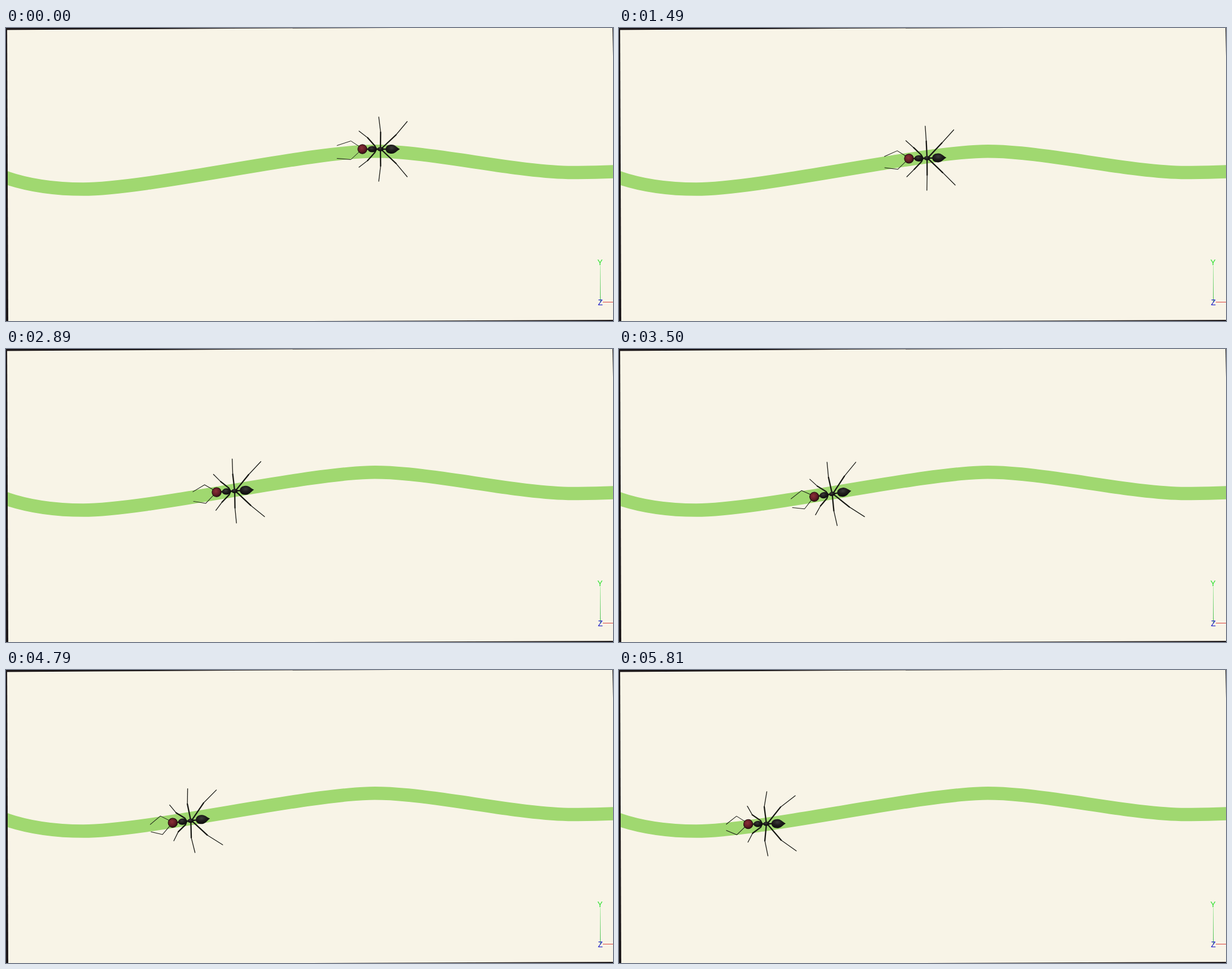
These frames come from a looping animation (1078x520 px, 5.84 s). An HTML page:

```html
<!DOCTYPE html>
<html lang="en">
<head>
<meta charset="utf-8">
<title>Ant on a trail</title>
<style>
  html, body { margin: 0; width: 100%; height: 100%; overflow: hidden; background: #1a1517; }
  svg { display: block; width: 100vw; height: 100vh; }
  #limbs path { fill: none; stroke: #171713; stroke-linecap: round; stroke-linejoin: round; }
  text { font: 14px "Liberation Sans", Arial, sans-serif; text-anchor: middle; }
</style>
</head>
<body>
<svg viewBox="0 0 1078 520" preserveAspectRatio="none">
  <defs>
    <radialGradient id="red" cx=".42" cy=".38" r=".65">
      <stop offset="0" stop-color="#8c3038"/>
      <stop offset=".6" stop-color="#621d26"/>
      <stop offset="1" stop-color="#2c0d12"/>
    </radialGradient>
    <radialGradient id="shell" cx=".42" cy=".36" r=".65">
      <stop offset="0" stop-color="#3b3b39"/>
      <stop offset=".5" stop-color="#1d1b1b"/>
      <stop offset="1" stop-color="#0c0b0b"/>
    </radialGradient>
    <linearGradient id="axis" gradientUnits="userSpaceOnUse" x1="0" y1="422" x2="0" y2="486">
      <stop offset="0" stop-color="#b4ecae"/>
      <stop offset="1" stop-color="#35b83c"/>
    </linearGradient>
    <clipPath id="sheet">
      <path id="edge" d="M2 3.5L160 2.5L400 1L690 0H1077L1078 50V518L540 520H4Z"/>
    </clipPath>
  </defs>
  <use href="#edge" fill="#f8f4e7"/>
  <path clip-path="url(#sheet)" fill="none" stroke="#a0d870" stroke-width="23.6"
    d="M-20 258C30 279 85 286 137 286C252 286 540 218.7 655 218.7C755 218.7 907 256.5 1007 256.5Q1050 256.5 1090 254.5"/>

  <path d="M1055.5 422V486" stroke="url(#axis)"/>
  <path d="M1060 486.5H1078" stroke="#d8403c"/>
  <text x="1055" y="420.5" fill="#22e022">Y</text>
  <text x="1055.5" y="492" fill="#1616c8">Z</text>

  <g id="ant">
    <g id="limbs"></g>
    <path d="M-24 0H10" stroke="#171713" stroke-width="2.5"/>
    <ellipse cx="-14.5" rx="8" ry="5.6" fill="url(#shell)"/>
    <ellipse rx="5.5" ry="3.8" fill="url(#shell)"/>
    <path d="M9 0C10 -6 14 -8 20 -8C26 -8 29 -3 34.5 0C29 3 26 8 20 8C14 8 10 6 9 0Z" fill="url(#shell)"/>
    <circle cx="-32" r="8.2" fill="url(#red)" stroke="#1d0b0d"/>
  </g>
</svg>
<script>
const LOOP = 5840, FIRST = 30, STEPS = 124;
const STEP = (LOOP - 2 * FIRST) / (STEPS - 1);

// where the ant is: step, x, y, heading in degrees
const route = [
  [0, 665, 215, 0],
  [14, 587, 222, -5.5],
  [32, 547, 231, -1.5],
  [62, 406, 252, -3.8],
  [87, 353, 262, -14],
  [102, 328, 267.5, -6.6],
  [124, 261.5, 273, -1]
];

// one side of the ant, facing left: hip, joint and resting foot
const legs = [
  { hip: [-7, 0], joint: [-10, 6], foot: [-38, 32] },
  { hip: [0, 0], joint: [0, 3], foot: [-3, 57] },
  { hip: [1, 0], joint: [5, 4], foot: [47.5, 49] }
];

const ant = document.getElementById("ant"), limbs = document.getElementById("limbs");

function limb(width) {
  const p = document.createElementNS("http://www.w3.org/2000/svg", "path");
  p.setAttribute("stroke-width", width);
  return limbs.appendChild(p);
}
const sides = [-1, 1].map(side => ({
  side,
  parts: legs.map(() => [limb(2.3), limb(1.3)]),
  feeler: limb(1)
}));

const line = (el, ...pts) => el.setAttribute("d", "M" + pts.join("L"));

function place(n) {
  const i = Math.max(1, route.findIndex(r => r[0] >= n));
  const a = route[i - 1], b = route[i], u = (n - a[0]) / (b[0] - a[0]);
  return a.map((v, c) => v + (b[c] - v) * u);
}

function draw(n) {
  const [, x, y, deg] = place(n), p = n / STEPS;
  ant.setAttribute("transform", `translate(${x} ${y}) rotate(${deg})`);

  // over the loop the knees fold back and the feet trail behind
  const bend = 1.8 - 5.8 * p, trail = 5 * p;
  for (const { side, parts, feeler } of sides) {
    legs.forEach(({ hip, joint, foot }, k) => {
      const [jx, jy] = joint, dx = foot[0] + trail - jx, dy = foot[1] - jy;
      const b = bend / Math.hypot(dx, dy);
      const knee = [jx + dx / 2 + dy * b, side * (jy + dy / 2 - dx * b)];
      line(parts[k][0], hip, [jx, side * jy], knee);
      line(parts[k][1], knee, [jx + dx, side * foot[1]]);
    });
    line(feeler, [-38, side * 5], [-52.5, 2 + side * 16.5], [-77 + 6 * p, 5 + side * (11.5 - 6 * p)]);
  }
}

function tick() {
  const t = performance.now() % LOOP;
  draw(t < FIRST ? 0 : Math.min(STEPS, Math.floor((t - FIRST) / STEP + 0.15) + 1));
  requestAnimationFrame(tick);
}
tick();
</script>
</body>
</html>
```
